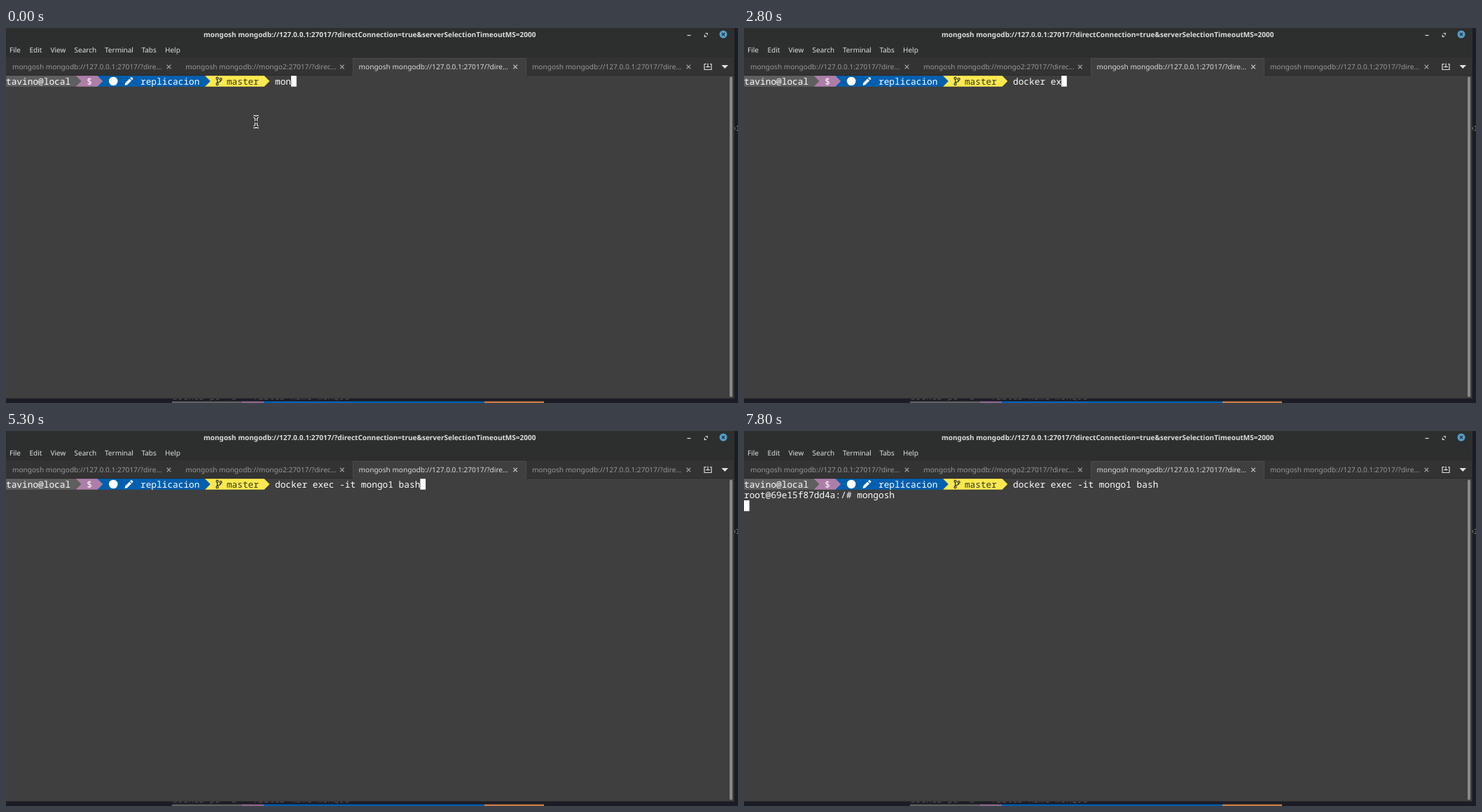
Write an HTML page that moves like this. It is 1045 px wide and 536 px high and loops after 8000 ms.

```html
<!DOCTYPE html>
<html lang="en">
<head>
<meta charset="utf-8">
<title>Terminal</title>
<style>
  html, body { margin: 0; width: 100%; height: 100%; overflow: hidden; background: #1b1c26; }
  svg { display: block; width: 1045px; height: 536px; }
  text { white-space: pre; text-rendering: geometricPrecision; }
  .ui { font: 10px "Noto Sans", sans-serif; fill: #e0e0e0; }
  .tab { font-size: 10.1px; fill: #989898; }
  .tab.on { fill: #dcdcdc; }
  .title { font-weight: 700; fill: #dedede; }
  .mono { font: 12.8px "Noto Sans Mono", monospace; fill: #fff; }
  .line { fill: none; stroke: #dedede; stroke-width: 1.2; }
</style>
</head>
<body>
<svg id="stage" viewBox="0 0 1045 536" xmlns="http://www.w3.org/2000/svg">
  <defs>
    <clipPath id="below"><rect y="529.5" width="1040" height="3"/></clipPath>
    <clipPath id="beside"><rect x="1040" y="130" width="5" height="30"/></clipPath>
  </defs>

  <!-- desktop behind the window -->
  <rect width="1045" height="536" fill="#1b1c26"/>
  <text class="mono" x="237" y="530.5" clip-path="url(#below)" style="fill:#60615f">docker ps -a --filter name=mongo1</text>
  <text class="mono" x="1034" y="147" clip-path="url(#beside)" style="fill:#7f8660">or</text>
  <g transform="translate(0 533.6)">
    <rect x="237" width="101" height="3" fill="#5f5f5f"/>
    <rect x="337" width="31" height="3" fill="#8d6789"/>
    <rect x="368" width="315" height="3" fill="#005faf"/>
    <rect x="683" width="85" height="3" fill="#c87a45"/>
  </g>

  <!-- window -->
  <rect width="1040" height="530" fill="#3f3f3f"/>
  <rect width="1040" height="42" fill="#2d2e2e"/>
  <rect y="42" width="1040" height="26" fill="#333"/>
  <rect y="67" width="1040" height="1" fill="#292929"/>
  <rect x="495.5" y="43" width="247" height="25" fill="#3f3f3f"/>
  <path d="M495.5 68V43.5H742.5V68" fill="none" stroke="#4a4a4a"/>
  <rect y="529" width="1040" height="1" fill="#292929"/>
  <rect x="1039" y="42" width="1" height="488" fill="#2a2a2a"/>
  <rect x="1033" y="69.5" width="4" height="458" rx="2" fill="#898989"/>

  <text class="ui title" x="282" y="13">mongosh mongodb://127.0.0.1:27017/?directConnection=true&amp;serverSelectionTimeoutMS=2000</text>
  <path class="line" d="M972.5 10.5h5"/>
  <path class="line" d="M998.5 7.5h2.7v2.7M1000 12.3h-2.7v-2.7" stroke-width="1"/>
  <circle cx="1024" cy="9" r="5.5" fill="#559fcb"/>
  <path d="M1022 7l4 4m0-4l-4 4" stroke="#25313a" stroke-width="1.3"/>
  <g id="bars"></g>
  <path class="line" d="M1000 51.5h-3v8h10v-8h-2M1002 50.5v6M999 55.5h6"/>
  <path d="M1021.5 53h9.5l-4.75 5z" fill="#e4e4e4"/>

  <!-- shell -->
  <g id="prompt"></g>
  <circle cx="153.2" cy="76" r="6.3" fill="#fff"/>
  <path d="M169.5 82l.8-3.6 6-6 2.8 2.8-6 6zM177 71.7l1.3-1.3q.8-.6 1.5 0l1.3 1.3q.6.7 0 1.5l-1.3 1.3z" fill="#fff"/>
  <g fill="none" stroke="#353527" stroke-width="1.3">
    <circle cx="301.6" cy="71.9" r="1.5"/>
    <circle cx="301.6" cy="80.2" r="1.5"/>
    <circle cx="306.6" cy="73.2" r="1.5"/>
    <path d="M301.6 73.4v5.3M306.6 74.7q0 2.2-2.4 2.4-2.2.1-2.6 1.5"/>
  </g>
  <text class="mono" id="cmd" x="384" y="80.6"></text>
  <text class="mono" id="root" x="0" y="96"></text>
  <rect id="caret" width="7.7" height="15.4" fill="#fff"/>

  <g id="pointer" fill="none">
    <path d="M353.5 126.5q3.5 0 3.5 2.5 0-2.5 3.5-2.5M357 128v12M353.5 141.5q3.5 0 3.5-2.5 0 2.5 3.5 2.5M355 134h4" stroke="#fff" stroke-width="4"/>
    <path d="M353.5 126.5q3.5 0 3.5 2.5 0-2.5 3.5-2.5M357 128v12M353.5 141.5q3.5 0 3.5-2.5 0 2.5 3.5 2.5M355 134h4" stroke="#111" stroke-width="1.5"/>
  </g>
</svg>
<script>
const $ = id => document.getElementById(id);
const CELL = 7.68, ROW = 15.4, TOP = 68.3, LOOP = 8000;

function add(parent, tag, attrs, text = '') {
  const el = document.createElementNS('http://www.w3.org/2000/svg', tag);
  for (const key in attrs) el.setAttribute(key, attrs[key]);
  el.textContent = text;
  return $(parent).appendChild(el);
}

const menu = { File: 5, Edit: 33.5, View: 63.5, Search: 97.5, Terminal: 141, Tabs: 193.5, Help: 227 };
for (const name in menu) add('bars', 'text', { class: 'ui', x: menu[name], y: 34.5 }, name);

['127.0.0.1:27017/?dire', 'mongo2:27017/?direc', '127.0.0.1:27017/?dire', '127.0.0.1:27017/?dire'].forEach((url, i) => {
  const x = 9 + 247.3 * i, on = i === 2;
  add('bars', 'text', { class: 'ui tab' + (on ? ' on' : ''), x, y: 59 }, `mongosh mongodb://${url}…`);
  add('bars', 'path', { d: `M${x + 220.7} 52.7l5.6 5.6m0-5.6l-5.6 5.6`, stroke: on ? '#ccc' : '#aaa', 'stroke-width': 1.2 });
});

// Powerline segments: first column, arrow column, colour, text column, text, text colour.
[
  [0, 13, '#5f5f5f', 0, 'tavino@local', '#fff'],
  [13, 17, '#ad7fa8', 15, '$', '#fff'],
  [17, 37, '#005faf', 25, 'replicacion', '#fff'],
  [37, 48, '#fce94f', 41, 'master', '#353527']
].reverse().forEach(([from, to, fill, col, text, ink]) => {
  const a = from * CELL, b = to * CELL, bottom = TOP + ROW;
  add('prompt', 'path', { d: `M${a} ${TOP}H${b}L${b + CELL} ${TOP + ROW / 2}L${b} ${bottom}H${a}z`, fill });
  add('prompt', 'text', { class: 'mono', x: col * CELL, y: 80.6, style: `fill:${ink}` }, text);
});

// Each step: time, text of the active line, row, caret shown.
const CMD = 'docker exec -it mongo1 bash', ROOT = 'root@69e15f87dd4a:/# ';
const steps = [
  [0, 'mon'], [100, 'mo'], [300, 'm'], [400, ''],
  [600, 'd'], [700, 'do'], [800, 'doc'], [1000, 'dock'], [1100, 'docke'], [1200, 'docker '],
  [1800, 'docker ', 0, false], [1900, 'docker ex'], [2200, 'docker exc'], [2800, 'docker ex'],
  [2900, 'docker exe'], [3000, 'docker exec'], [3100, 'docker exec '], [3200, 'docker exec -'],
  [3400, 'docker exec -i'], [3500, 'docker exec -it '], [4100, 'docker exec -it ', 0, false],
  [4200, 'docker exec -it mo'], [4300, 'docker exec -it mong'], [4400, 'docker exec -it mongo'],
  [4500, 'docker exec -it mongo1'], [4700, 'docker exec -it mongo1 '],
  [5100, 'docker exec -it mongo1 b'], [5200, 'docker exec -it mongo1 ba'], [5300, CMD],
  [5900, CMD, 0, false], [6000, CMD], [6100, '', 1], [6300, ROOT, 1], [6600, ROOT, 1, false],
  ...[...'mongosh'].map((_, i) => [7000 + 100 * i, ROOT + 'mongosh'.slice(0, i + 1), 1]),
  [7800, '', 2]
];

let shown;
function draw(now) {
  const t = now % LOOP;
  const step = steps.findLast(s => s[0] <= t);
  if (step !== shown) {
    shown = step;
    const [time, text, row = 0, caret = true] = step;
    $('cmd').textContent = row ? CMD : text;
    $('root').textContent = row === 1 ? text : row ? ROOT + 'mongosh' : '';
    $('caret').setAttribute('x', ((row ? 0 : 50) + text.length) * CELL);
    $('caret').setAttribute('y', TOP + row * ROW);
    $('caret').setAttribute('visibility', caret ? 'visible' : 'hidden');
    $('pointer').setAttribute('visibility', time < 100 ? 'visible' : 'hidden');
  }
  requestAnimationFrame(() => draw(performance.now()));
}
draw(performance.now());
</script>
</body>
</html>
```
